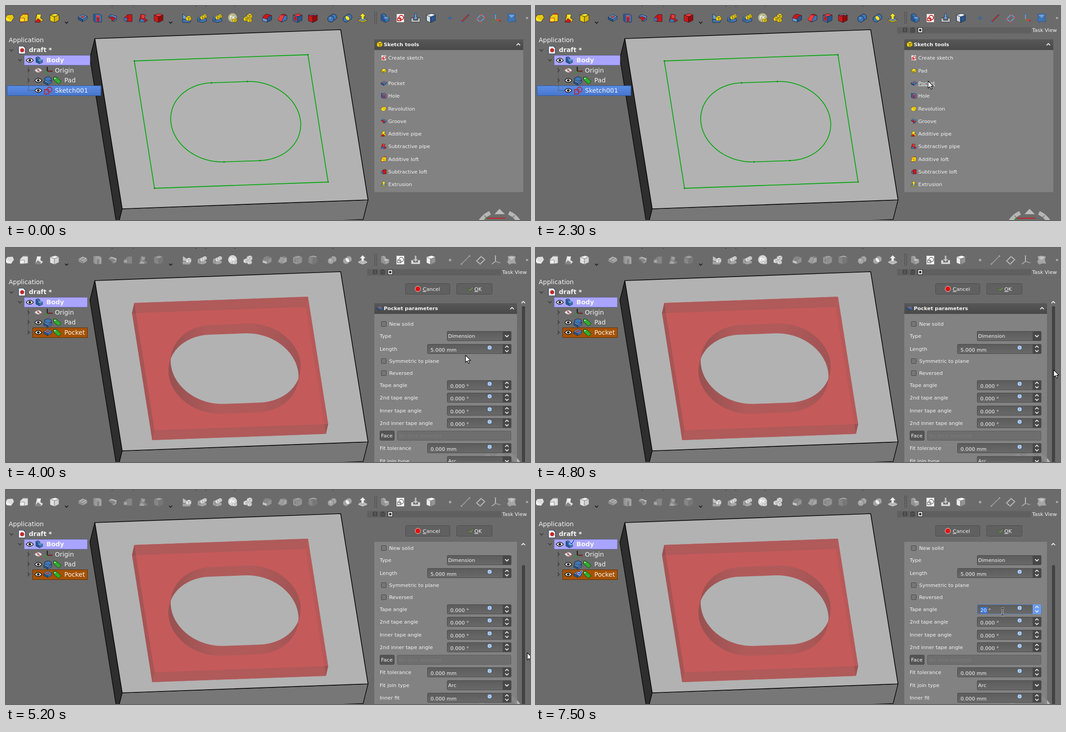
An HTML page for the animation above (8 s loop, 1168 px wide and 479 px high).

```html
<!DOCTYPE html>
<html lang="en">
<head>
<meta charset="utf-8">
<title>Pocket from sketch</title>
<style>
  html, body { margin: 0; width: 100%; height: 100%; overflow: hidden; background: #6b6b6b; }
  svg { display: block; width: 1168px; height: 479px; }
  text { font: 11.33px "DejaVu Sans", sans-serif; fill: #f4f4f4; white-space: pre; }
  .tree { font-size: 14px; }
  .b { font-weight: bold; }
  .u { text-decoration: underline; }
  .dim { fill: #7c7c7c; }
  .off { filter: grayscale(1) contrast(.48) brightness(1.4); }
</style>
</head>
<body>
<svg id="stage" viewBox="0 0 1168 479" xmlns="http://www.w3.org/2000/svg"></svg>
<script>
const LOOP = 8000;
const Y = ['#fce428', '#d8b400', '#e9cb10'];
const B = ['#6c9fd8', '#28568f', '#3f74b4'];
const R = ['#ef3a3a', '#9c0808', '#c81818'];

// Markup helpers
const path = (d, fill = 'none', stroke = 'none', w = 1, more = '') =>
  `<path d="${d}" fill="${fill}" stroke="${stroke}" stroke-width="${w}" stroke-linejoin="round" ${more}/>`;
const rect = (x, y, w, h, fill, stroke = 'none', r = 0, more = '') =>
  `<rect x="${x}" y="${y}" width="${w}" height="${h}" fill="${fill}" stroke="${stroke}" rx="${r}" ${more}/>`;
const dot = (x, y, r, fill, stroke = 'none') =>
  `<circle cx="${x}" cy="${y}" r="${r}" fill="${fill}" stroke="${stroke}"/>`;
const text = (x, y, s, cls = '', more = '') => `<text x="${x}" y="${y}" class="${cls}" ${more}>${s}</text>`;
const at = (x, y, body, k = 1) => `<g transform="translate(${x} ${y}) scale(${k})">${body}</g>`;
const group = (id, body, more = '') => `<g id="${id}" ${more}>${body}</g>`;
const chevron = (x, y, dir, c = '#f0f0f0', r = 4) =>
  path(`M${-r} ${r / 2}L0 ${-r / 2}L${r} ${r / 2}`, 'none', c, 1.8, `transform="translate(${x} ${y}) rotate(${dir})"`);

// Icons, drawn around 0,0 in about 22 px
const INK = '#16202c';
const slab = c => path('M-10 -2L0 -8L10 -4L0 3Z', c[0], INK, .8) +
  path('M-10 -2V3L0 8V3Z', c[1], INK, .8) + path('M10 -4V2L0 8V3Z', c[2], INK, .8);
const cube = (c, top = c) => path('M-10 -7L2 -10L10 -7L0 -3Z', top[0], INK, .8) +
  path('M-10 -7V6L0 10V-3Z', c[2], INK, .8) + path('M10 -7V5L0 10V-3Z', c[1], INK, .8);
const icons = {
  pad: slab(Y),
  revolve: path('M-10 0L-5 -7L7 -8L10 -1L4 8L-6 7Z', Y[2], INK, .8) + path('M-10 0L-4 0L4 8L-6 7Z', Y[0]) + path('M-4 0L10 -1', 'none', Y[1], 1),
  loft: path('M-9 -2L-2 -9L9 -8V7L-2 9H-9Z', Y[2], INK, .8) + rect(-9, 0, 10, 8, Y[0], R[2]) + path('M-2 -9H9', 'none', R[2], 2),
  pipe: path('M-5 -9L4 -8L3 0L9 4L4 9L-9 8Z', Y[2], INK, .8) + path('M-10 9L-3 1L4 6L1 10Z', R[2], INK, .6) + path('M-4 -8H4L2 -1H-3Z', Y[0]),
  box: cube(Y),
  pocket: slab(B) + path('M-5 -2L0 -5L5 -4L0 0Z', R[0], INK, .7),
  hole: path('M-9 -9H4L9 -6V9H-5L-9 6Z', B[2], INK, .8) + path('M-9 -9H-4V9L-9 6Z', B[1]) + path('M-2 -5H4V8H-2Z', R[2]) + `<ellipse cx="1" cy="-4" rx="3.5" ry="2.5" fill="${R[0]}"/>`,
  groove: path('M-10 -3L-4 -8L9 -4L8 4L2 8L-2 0Z', B[2], INK, .8) + path('M-9 -1Q1 -6 6 1L-2 8Q0 2 -9 -1Z', R[2], INK, .5) + path('M-2 -6L8 -2', 'none', B[0], 1.5),
  cutLoft: path('M-9 0L-1 -8L9 -8V8H-4Z', R[2], INK, .8) + rect(-9, 0, 7, 6, B[2], B[1]) + path('M-1 -8V8', 'none', R[1], 1),
  cutPipe: path('M-5 -9L5 -7L3 1L10 5L4 9L-9 6Z', R[2], INK, .8) + path('M-10 8L-4 1L4 6L0 9Z', B[2], INK, .6) + path('M-4 -8L4 -6L2 0L-3 0Z', R[0]),
  cutBox: cube(R),
  sketch: rect(-8.5, -9.5, 17, 19, '#f6f6f6', '#777') + rect(-6, 0, 7, 6, 'none', '#cc1111', 0, 'stroke-width="1.8"') + `<circle cx="2" cy="-1" r="5" fill="none" stroke="#cc1111" stroke-width="1.8"/>`,
  extrude: path('M-10 3L0 -1L10 3L0 9Z', B[0], INK, .7) + path('M-10 3V6L0 10L10 6V3L0 7Z', Y[1], INK, .6) + path('M0 -11L7 -4H3V3H-3V-4H-7Z', Y[0], INK, .7),
  body: path('M-9 -8L-3 -10L2 -7V-3L9 -1V6L1 10L-9 5Z', B[2], INK, .8) + path('M-9 -8L-3 -5V0L1 2V10L-9 5Z', B[1]) + path('M-3 0L2 -3L9 -1L1 2Z', B[0]),
  pattern: path('M-10 2L0 -2L10 2V7L0 10L-10 7Z', B[2], INK, .8) + at(-5, 1, cube(B), .45) + at(1, -1, cube(Y), .5) + at(6, -4, cube(Y), .45),
  mirror: path('M-10 3H10L7 10H-9Z', B[2], INK, .8) + path('M-9 -9L-1 -4V3L-9 2Z', B[0], INK, .8) + at(4, 1, cube(Y), .6),
  multi: at(4, -4, cube(Y), .6) + at(-4, 2, cube(Y), .55) + at(4, 5, cube(Y), .5),
  fx: dot(0, -1, 10, '#b9b68c') + at(5, 5, cube(Y), .5) + text(-7, 2, 'fx', 'b', 'style="font-style:italic"'),
  fillet: path('M-10 6V0Q-8 -8 0 -9L10 -6V4L0 9Z', R[2], INK, .8) + path('M-10 0L0 3V9L-10 6Z', B[0], INK, .6) + path('M10 -5V4L0 9V3Q2 -5 10 -5Z', B[1], INK, .6),
  chamfer: path('M-10 4L-4 -7L4 -9L10 -6V4L-2 9Z', R[2], INK, .8) + path('M-10 4L-2 7L4 -5L-4 -7Z', R[0]) + path('M10 -6V4L-2 9L4 -5Z', B[2], INK, .6),
  draft: cube(B, R) + path('M-8 -4L-2 -2V7L-8 4Z', R[2]),
  thick: cube(R, B) + path('M-7 -6L2 -8L7 -6L0 -4Z', R[1]),
  union: dot(3, -2, 7, B[2], INK) + dot(-3, 2, 7, B[2], INK) + dot(-4, 0, 2, B[0]),
  common: dot(3, -2, 7, B[2], INK) + dot(-3, 2, 7, B[2], INK) + path('M4 5A7 7 0 0 1 -4 -5A7 7 0 0 1 4 5Z', Y[0], INK, .7),
  place: path('M-10 0H-5V5H5V0H10V9H-10Z', '#bfc3c6', '#333') + path('M-2 -10H2V-2H6L0 4L-6 -2H-2Z', B[0], INK, .7),
  clone: cube(B) + path('M-9 -6V6L-2 9V-3Z', '#d8d8d8') + path('M-10 -7L2 -10L10 -7L0 -3Z', '#e8f0f8', INK, .6),
  point: dot(0, 0, 2.8, B[2], B[1]),
  line: path('M-9 9L9 -9', 'none', INK, 3) + path('M-9 9L9 -9', 'none', R[0], 1.6) + dot(-9, 9, 1.8, B[2]) + dot(9, -9, 1.8, B[2]),
  plane: path('M-9 2L1 -8L9 -1L-1 9Z', 'none', B[0], 1.8) + [[-9, 2], [1, -8], [9, -1], [-1, 9]].map(p => dot(p[0], p[1], 1.8, R[0])).join(''),
  axes: path('M-1 3V-9', 'none', B[0], 2) + path('M-1 3L9 6', 'none', R[0], 2) + path('M-1 3L-9 9', 'none', '#4b8f3a', 2) + dot(-1, -9, 1.8, B[2]) + dot(9, 6, 1.8, R[2]),
  binder: path('M-9 -8Q0 -11 9 -8L7 0L10 8Q0 6 -5 10L-10 4Q-5 -1 -9 -8Z', B[2], B[1], 1) + path('M-7 -7Q0 -9 7 -7L0 0Z', B[0]),
};
const icon = (name, x, y, k = 1) => at(x, y, icons[name], k);

const toolbar = {
  revolve: 8, loft: 40, pipe: 74, box: 108, pocket: 171, hole: 204, groove: 238, cutLoft: 272, cutPipe: 306, cutBox: 340,
  mirror: 403, pattern: [437, 471], fx: 505, multi: 539, fillet: 582, chamfer: 616, draft: 650, thick: 684,
  union: 727, common: 761, extrude: 795, body: 845, sketch: 879, place: 913, clone: 947,
  point: 990, line: 1024, plane: 1058, axes: 1092, binder: 1127,
};
const tools = Object.entries(toolbar).map(([n, xs]) => [xs].flat().map(x => icon(n, x, 27)).join('')).join('');

// 3D view
const SLOT = 'M-.385 -1H.385A1 1 0 0 1 .385 1H-.385A1 1 0 0 1 -.385 -1Z';
const slotAt = k => `transform="matrix(104 -3.8 14 88.5 ${512 - 5 * k} ${259 + 22 * k})"`;
const GREEN = '#00a80a';
const solid = path('M198 73L187 117L248 498L259 454Z', '#2e2e2e', '#0a0a0a', 1.5) +
  path('M259 454L807 434L796 478L248 498Z', '#777', '#0a0a0a', 1.5) +
  path('M198 73L746 53L807 434L259 454Z', '#b2b2b2', '#0a0a0a', 1.7);
const ends = [[286, 123], [673, 109], [718, 394], [331, 408], [458, 172], [538, 169], [566, 346], [486, 349]];
const outline = path('M286 123L673 109L718 394L331 408Z', 'none', GREEN, 1.8) +
  path(SLOT, 'none', GREEN, 1.8, slotAt(0) + ' vector-effect="non-scaling-stroke"') +
  ends.map(p => dot(p[0], p[1], 1.7, '#0b8a10')).join('');
const pocket = path('M286 123L673 109L718 394L713 416L326 430L281 146Z', '#c55a5a') +
  path('M673 109L718 394L713 416L668 132Z', '#b85959') +
  path('M286 123L673 109L668 132L281 146Z', '#b05a5a') +
  path('M286 123L331 408L326 430L281 146Z', '#a65555') +
  path('M286 123L289.500 145.700L281 146Z', '#985151') +
  path('M331 408L718 394L713 416L326 430Z', '#b05a5a') +
  path('M331 408L326 430L322.500 408.300Z', '#a65555') +
  path('M718 394L713 416L709.700 394.300Z', '#9c5252') +
  [0, .5, 1].map(k => path(SLOT, 'url(#wall)', 'none', 1, slotAt(k))).join('') +
  `<g clip-path="url(#rim)">${path(SLOT, '#b2b2b2', 'none', 1, slotAt(1))}</g>`;
const navCube = path('M1056 484A50 50 0 0 1 1079 463M1121 463A50 50 0 0 1 1144 484', 'none', '#b6b6b6', 9) +
  path('M1066 469L1074 476M1134 469L1126 476', 'none', '#6b6b6b', 1.5) +
  path('M1100 454L1112 466H1089Z', '#bababa') +
  path('M1072 475H1113', 'none', '#d01818', 2) + path('M1069 474V479', 'none', '#18b018', 2);

// Model tree
const eye = (x, y, ink = '#111') => at(x, y, path('M-8 0Q0 -9 8 0Q0 9 -8 0Z', '#fff', ink, 1.4) + dot(0, 0, 2.8, ink));
const tag = (x, y) => at(x, y, path('M-8 -7H-2L9 3L3 9L-8 -1Z', '#2fae2f', '#123a12', 1) + dot(-5, -4, 1.3, '#fff'));
const check = (x, y) => at(x, y, path('M-5 0L-1 4L5 -5', 'none', '#fff', 4) + path('M-5 0L-1 4L5 -5', 'none', '#1f4fe0', 2.4));
const fork = (x, y, dir) => chevron(x, y, dir, '#424242', 4);
const treeBase = text(6, 81, 'Application', 'tree') + path('M31 126V121M50 134V189H62', 'none', '#5d5d5d', 1) +
  fork(12, 99, 180) + fork(31, 121, 180) + fork(50, 144, 90) + fork(50, 166, 90) +
  path('M28 90H39L43 94V107H28Z', '#f4f4f4', '#2a3e60', 1.2) + dot(36, 99, 4.5, '#c22a2a') +
  text(51, 103, 'draft *', 'tree b') + eye(53, 121.500) + icon('body', 74, 121.500, .82) + text(90, 126, 'Body', 'tree b') +
  eye(72, 144, '#9a9a9a') + path('M66 138L79 150', 'none', '#c84848', 1.6) +
  path('M92 136V146H104', 'none', '#222', 2.5) + path('M92 146L86 151', 'none', '#2c9a2c', 2.5) + path('M93 146H104', 'none', '#a02020', 1.5) +
  text(109, 149, 'Origin', 'tree') + eye(72, 166.500) + icon('pad', 93, 170, .9).replaceAll(Y[0], B[0]).replaceAll(Y[1], B[1]).replaceAll(Y[2], B[2]) +
  path('M86 161L94 158L101 161V166L93 169L86 166Z', B[2], INK, .9) +
  tag(114, 166) + text(130, 171, 'Pad', 'tree') + eye(72, 189);
const treeSketch = path('M86 187H95V197H86Z', 'none', '#b82a35', 2) +
  `<circle cx="97" cy="187" r="5.500" fill="none" stroke="#b82a35" stroke-width="2"/>` + text(109, 194, 'Sketch001', 'tree');
const treePocket = fork(50, 189, 90) + icon('pocket', 93, 189, .9) + tag(114, 189) + text(130, 194, 'Pocket', 'tree');

// Task panel
const commands = [['sketch', 'Create sketch'], ['pad', 'Pad'], ['pocket', 'Pocket'], ['hole', 'Hole'], ['revolve', 'Revolution'],
  ['groove', 'Groove'], ['pipe', 'Additive pipe'], ['cutPipe', 'Subtractive pipe'], ['loft', 'Additive loft'],
  ['cutLoft', 'Subtractive loft'], ['extrude', 'Extrusion']];
const rowY = i => Math.round(116.3 + 28.3 * i);
const list = rect(821, 98, 332, 318.500, '#828282') + rect(821, 74.500, 332, 24, 'url(#head)') +
  icon('box', 833, 86, .65) + text(842, 90, 'Sketch tools', 'b') + chevron(1142, 86, 0) +
  commands.map(([n, s], i) => icon(n, 842, rowY(i), .62) + text(852, rowY(i) + 4, s, 'cmd')).join('');
const titleBar = rect(805, 47, 299, 14.500, '#606060') + path('M809 49V60M862 51H1102M862 54H1102M862 57H1102', 'none', '#585858', 1, 'stroke-dasharray="1 1"') +
  rect(818.500, 49.500, 8, 8, 'none', '#2c2c2c') + path('M818 53.500H827', 'none', '#2c2c2c') +
  rect(835.500, 50.500, 8, 8, 'none', '#2c2c2c') + path('M837 49H842M837 53.500H842M837 56H842', 'none', '#2c2c2c') +
  rect(851.500, 48.500, 10, 11, '#e4e4e4', '#222') + rect(854, 51.500, 5, 5, '#333') + text(1106, 58, 'Task View');

const label = (y, s) => text(833, y + 4, s);
const spin = y => chevron(1116.500, y - 5, 0, '#f0f0f0', 3.7) + chevron(1116.500, y + 4.500, 180, '#f0f0f0', 3.7);
const box = (x, y, blue) => rect(x + .5, y - 10.500, 1125.500 - x, 21, 'url(#field)', blue ? '#587fc8' : '#484848', 2) +
  rect(1107, y - 11, 19, 22, blue ? '#6b9cf0' : '#484848', 'none', 2);
const badge = y => dot(1078, y - 3, 4.800, '#d6e4f5', '#3c6fae') + path(`M1075 ${y - 3}H1081M1076 ${y - 5}H1080M1076 ${y - 1}H1080`, 'none', '#5d8cc4', 1);
const value = (x, y, s, id = '') => text(x + 7.3, y + 6, s, '', id && `id="${id}"`);
const field = (y, name, x, s) => label(y, name) + box(x, y) + value(x, y, s) + badge(y) + spin(y);
const combo = (y, name, s) => label(y, name) + box(983, y) + text(985.500, y + 4, s) + chevron(1116.500, y, 180);
const tick = (y, s) => rect(836.500, y - 5.500, 11, 11, '#767676', '#454545', 1) + text(854, y + 4, s);
const button = (x, w) => rect(x + .5, 79.500, w, 24, '#606060', '#4c4c4c', 3);
const TAPE = 307, LENGTH = 226;
const fields = [[LENGTH, 939], [TAPE, 983], [335, 983], [364, 983], [392, 983], [448, 939], [505, 939]];
const names = ['Length', 'Tape angle', '2nd tape angle', 'Inner tape angle', '2nd inner tape angle', 'Fit tolerance', 'Inner fit'];

const mark = (x, y, w, id) => rect(x, y - 5, w, 14, '#3a76e0', 'none', 0, `id="${id}"`);
const focusLength = box(939, LENGTH, true) + mark(946, LENGTH, 34, 'lengthMark') + value(939, LENGTH, '5.000 mm') + badge(LENGTH) + spin(LENGTH);
const focusTape = box(983, TAPE, true) + mark(991, TAPE, 15, 'mark') + value(983, TAPE, '', 'tapeNew') +
  rect(1032, TAPE - 5, 1, 14, '#f4f4f4', 'none', 0, 'id="caret"') + badge(TAPE) + spin(TAPE);
const form = rect(821, 147, 318, 500, '#858585', 'none', 0, 'opacity=".9"') + rect(821, 123.500, 318, 24, 'url(#head)') +
  icon('pocket', 833, 135, .62) + text(842, 139, 'Pocket parameters', 'b') + chevron(1128, 135, 0) +
  tick(170, 'New solid') + combo(197, 'Type', 'Dimension') + tick(253, 'Symmetric to plane') + tick(280, 'Reversed') +
  fields.map(([y, x], i) => field(y, names[i], x, i && x > 940 ? '0.000 °' : i ? '0.000 mm' : '5.000 mm')).join('') +
  rect(833.500, 409.500, 32, 21, '#545454', '#484848', 2) + text(836, 424, 'Face') +
  rect(872.500, 409.500, 253, 21, '#6e6e6e', '#5c5c5c', 2) + text(875.500, 424, 'No face selected', 'dim') +
  combo(477, 'Fit join type', 'Arc') + group('focusLength', focusLength) + group('focusTape', focusTape);
const dialog = button(890, 99) + dot(918, 91.500, 6, '#e01010', '#f2dada') + text(929, 96, '<tspan class="u">C</tspan>ancel') +
  button(1004, 79) + path('M1028 91L1031 90L1034 93L1040 87L1043 88L1035 97Z', '#76905c', '#3f4a34') + text(1044, 96, '<tspan class="u">O</tspan>K') +
  `<g clip-path="url(#view)">${group('form', form)}</g>` + chevron(1153, 121.500, 0) +
  rect(1150, 130, 7, 500, '#424242', 'none', 3, 'id="bar"');

const arrow = path('M0 0V16L4 12.500L6.500 18.500L9 17.300L6.600 11.600H11.500Z', '#fff', '#000', 1.1);
const BEAM = 'M-3.500 -7.500H-1L0 -6.500L1 -7.500H3.500M0 -6.500V6.500M-3.500 7.500H-1L0 6.500L1 7.500H3.500';
const beam = path(BEAM, 'none', '#fff', 3) + path(BEAM, 'none', '#000', 1.3);
const grad = (id, a, b) => `<linearGradient id="${id}" x2="0" y2="1"><stop stop-color="${a}"/><stop offset="1" stop-color="${b}"/></linearGradient>`;

document.getElementById('stage').innerHTML = `<defs>
  ${grad('head', '#585858', '#484848')}${grad('field', '#5c5c5c', '#696969')}${grad('pick', '#5b8ce4', '#4776cc')}
  <linearGradient id="wall"><stop stop-color="#985151"/><stop offset=".32" stop-color="#b15a5a"/>
  <stop offset=".68" stop-color="#b15a5a"/><stop offset="1" stop-color="#a05454"/></linearGradient>
  <clipPath id="rim"><path d="${SLOT}" ${slotAt(0)}/></clipPath>
  <clipPath id="view"><rect x="815" y="116" width="330" height="363"/></clipPath></defs>` +
  rect(0, 0, 1168, 479, '#6b6b6b') +
  path('M235 0H238M283 0H285M422 0H425M444 0H447M509 0H512M727 0H730', 'none', '#2c2c2c', 2) +
  solid + group('outline', outline) + group('pocket', pocket) + group('tools', tools) +
  chevron(135, 37, 180, '#222', 3.5) + chevron(367, 37, 180, '#222', 3.5) + text(1158, 30, '»') +
  path('M822 13V41M826 13V41', 'none', '#484848', 2, 'stroke-dasharray="2 2"') +
  rect(40.5, 110.5, 147, 22, '#a9a5ff', '#6a68a8', 0, 'id="bodyRow"') +
  group('sketchRow', rect(2.500, 178.500, 209, 22, 'url(#pick)', '#2d5cab')) +
  group('pocketRow', rect(59.500, 178.500, 122, 22, '#a65200', '#5b2e04')) +
  treeBase + group('treeSketch', treeSketch) + group('treePocket', treePocket) +
  group('checks', check(80, 117) + check(98, 185)) +
  navCube + group('titleBar', titleBar) + group('list', list) + group('dialog', dialog) +
  group('cursor', group('arrow', arrow) + group('beam', beam));

const el = id => document.getElementById(id);
const show = (id, on) => el(id).setAttribute('display', on ? 'inline' : 'none');
const cmds = [...document.querySelectorAll('.cmd')];

// Linear interpolation through [time, value, ...] keys
function track(keys, t) {
  const n = keys.findIndex(k => k[0] > t);
  if (n < 0) return keys[keys.length - 1].slice(1);
  if (n === 0) return keys[0].slice(1);
  const a = keys[n - 1], b = keys[n], f = (t - a[0]) / (b[0] - a[0]);
  return a.slice(1).map((v, i) => v + (b[i + 1] - v) * f);
}
const pointer = [[300, 333, 1], [700, 690, 96], [1100, 853, 149], [1200, 861, 157], [1300, 867, 165], [2100, 867, 165],
  [2200, 870, 165], [2300, 874, 168], [3100, 874, 168], [3600, 981, 229], [3800, 981, 229], [4600, 1154, 273],
  [4800, 1154, 273], [5000, 1160, 321], [5300, 1163, 386], [5600, 1163, 386], [6000, 1058, 250], [6500, 1040, 272.500]];
const scrolling = [[4800, 0], [5000, 27], [5100, 40]];

function draw(ms) {
  const t = Math.floor(ms / 100) * 100;
  const edit = t >= 3100;
  const [x, y] = track(pointer, t), s = Math.round(track(scrolling, t)[0]);

  for (const id of ['outline', 'sketchRow', 'treeSketch', 'list']) show(id, !edit);
  for (const id of ['pocket', 'pocketRow', 'treePocket', 'dialog']) show(id, edit);
  el('tools').setAttribute('class', edit ? 'off' : '');
  el('bodyRow').setAttribute('width', edit ? 141 : 147);
  show('titleBar', t >= 300 && x > 805);
  show('checks', t >= 7400);

  cmds.forEach((c, i) => c.setAttribute('class', t >= 300 && x > 826 && Math.abs(y - rowY(i)) < 9 ? 'cmd u' : 'cmd'));

  el('form').setAttribute('transform', `translate(0 ${-s})`);
  el('bar').setAttribute('y', 130 + .95 * s);
  el('bar').setAttribute('fill', t < 3200 ? '#7c7c7c' : '#424242');
  show('focusLength', t < 3200);
  show('focusTape', t >= 6500);
  show('mark', t >= 7500);
  show('caret', t < 7000 || (t >= 7200 && t < 7500));
  el('caret').setAttribute('x', t < 7200 ? 1032 : 1006);
  el('tapeNew').textContent = t < 7200 ? '0.000 °' : '20 °';

  const typing = edit && fields.some(([fy, fx]) => x > fx && x < 1107 && Math.abs(y - fy + s) < 11);
  show('cursor', t >= 300);
  show('beam', typing);
  show('arrow', !typing);
  el('cursor').setAttribute('transform', `translate(${x} ${y})`);
}

const start = performance.now();
function play(now) {
  draw(Math.max(0, now - start) % LOOP);
  requestAnimationFrame(play);
}
draw(0);
requestAnimationFrame(play);
</script>
</body>
</html>
```
